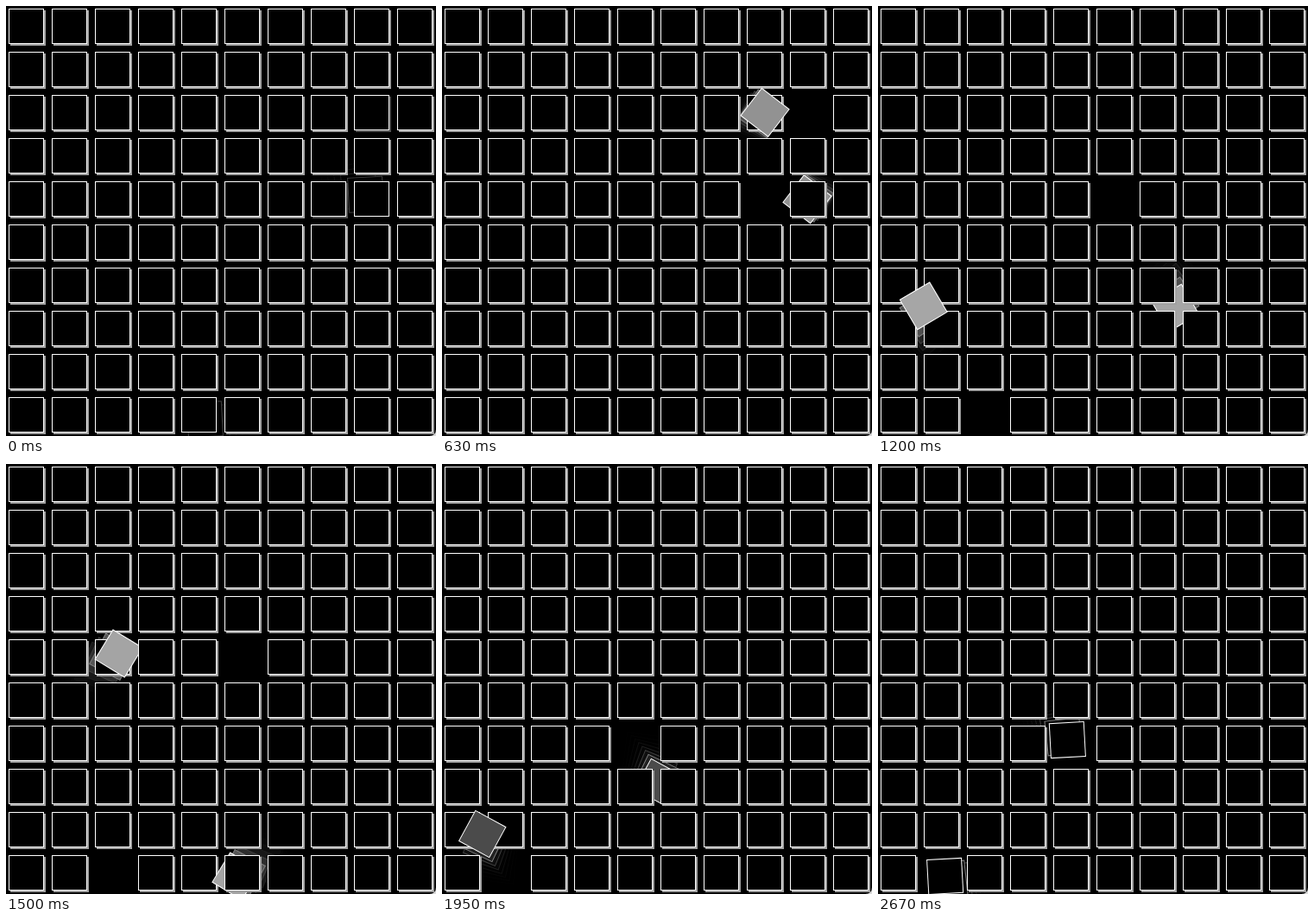
Write an HTML page with a canvas that moves like this. It is 498 by 498 pixels and loops after 2700 ms.

```html
<!DOCTYPE html>
<html lang="en">
<head>
<meta charset="utf-8">
<title>Swapping tiles</title>
<style>
  html, body { margin: 0; width: 100%; height: 100%; overflow: hidden; background: #000; }
  canvas { display: block; }
</style>
</head>
<body>
<canvas id="stage" width="498" height="498"></canvas>
<script>
const ctx = document.getElementById('stage').getContext('2d');
const SIZE = 498, PITCH = 50, COUNT = 10, TILE = 41;
const FRAME = 30, LOOP = 2700;
const STEPS = 60;    // simulation steps per swap, two per frame
const TRAIL = 8;     // fading copies behind a moving tile
const FADE = 0.5;
const SHADOW = 160;

// Each swap: two cells as [column, row] that trade places by a half turn.
const swaps = [
  [[7, 4], [8, 2]],
  [[2, 9], [5, 4]],
  [[1, 9], [4, 6]]
];
const lastSwap = [[4, 9], [8, 4]];

const centre = i => 23.5 + i * PITCH;
const clamp = (v, max = 1) => Math.min(max, Math.max(0, v));
const progress = step => clamp((step - 0.75) / (STEPS - 1.75));
const grey = v => { v = Math.round(v); return `rgb(${v},${v},${v})`; };
const includes = (pair, [col, row]) => pair.some(c => c[0] === col && c[1] === row);

function square(fill, border) {
  const h = TILE / 2;
  ctx.fillStyle = border;
  ctx.fillRect(-h, -h, TILE, TILE);
  ctx.fillStyle = fill;
  ctx.fillRect(1 - h, 1 - h, TILE - 2, TILE - 2);
}

function restingTile([col, row], shadow, light = 1) {
  ctx.save();
  ctx.translate(centre(col), centre(row));
  if (shadow) {
    ctx.fillStyle = grey(shadow * light);
    ctx.fillRect(2 - TILE / 2, 2 - TILE / 2, TILE, TILE);
  }
  square('#000', grey(255 * light));
  ctx.restore();
}

function movingTile(pair, cell, p, light = 1) {
  const mx = (centre(pair[0][0]) + centre(pair[1][0])) / 2;
  const my = (centre(pair[0][1]) + centre(pair[1][1])) / 2;
  const glow = clamp(265 * (1 - Math.abs(2 * p - 1)) - 9, 255);
  ctx.save();
  ctx.translate(mx, my);
  ctx.rotate(Math.PI * p);
  ctx.translate(centre(cell[0]) - mx, centre(cell[1]) - my);
  square(grey(glow * light), grey(255 * light));
  ctx.restore();
}

function trail(pair, before, step) {
  for (let k = TRAIL; k > 0; k--) {
    const s = step - k, light = FADE ** k;
    if (s < 0) {
      before.forEach(c => movingTile(before, c, progress(s + STEPS), light));
      pair.forEach(c => restingTile(c, SHADOW, light));
    } else {
      pair.forEach(c => movingTile(pair, c, progress(s), light));
    }
  }
}

function corner() {
  ctx.fillStyle = '#ddd';
  ctx.beginPath();
  ctx.moveTo(SIZE, SIZE - 8);
  ctx.quadraticCurveTo(SIZE, SIZE, SIZE - 8, SIZE);
  ctx.lineTo(SIZE, SIZE);
  ctx.fill();
}

function draw(time) {
  const step = 2 * Math.floor((time % LOOP) / FRAME);
  const index = Math.floor(step / STEPS), s = step % STEPS;
  const pair = swaps[index], before = swaps[index - 1] || lastSwap;

  ctx.fillStyle = '#000';
  ctx.fillRect(0, 0, SIZE, SIZE);
  trail(pair, before, s);

  // Column by column, so later columns cover tiles that belong to earlier ones.
  for (let col = 0; col < COUNT; col++) {
    for (let row = 0; row < COUNT; row++) {
      const cell = [col, row];
      if (includes(pair, cell)) movingTile(pair, cell, progress(s));
      else restingTile(cell, s === 0 && includes(before, cell) ? 0 : SHADOW);
    }
  }
  corner();
}

let start;
function tick(now) {
  if (start === undefined) start = now;
  draw(Math.max(0, now - start));
  requestAnimationFrame(tick);
}
draw(0);
requestAnimationFrame(tick);
</script>
</body>
</html>
```
